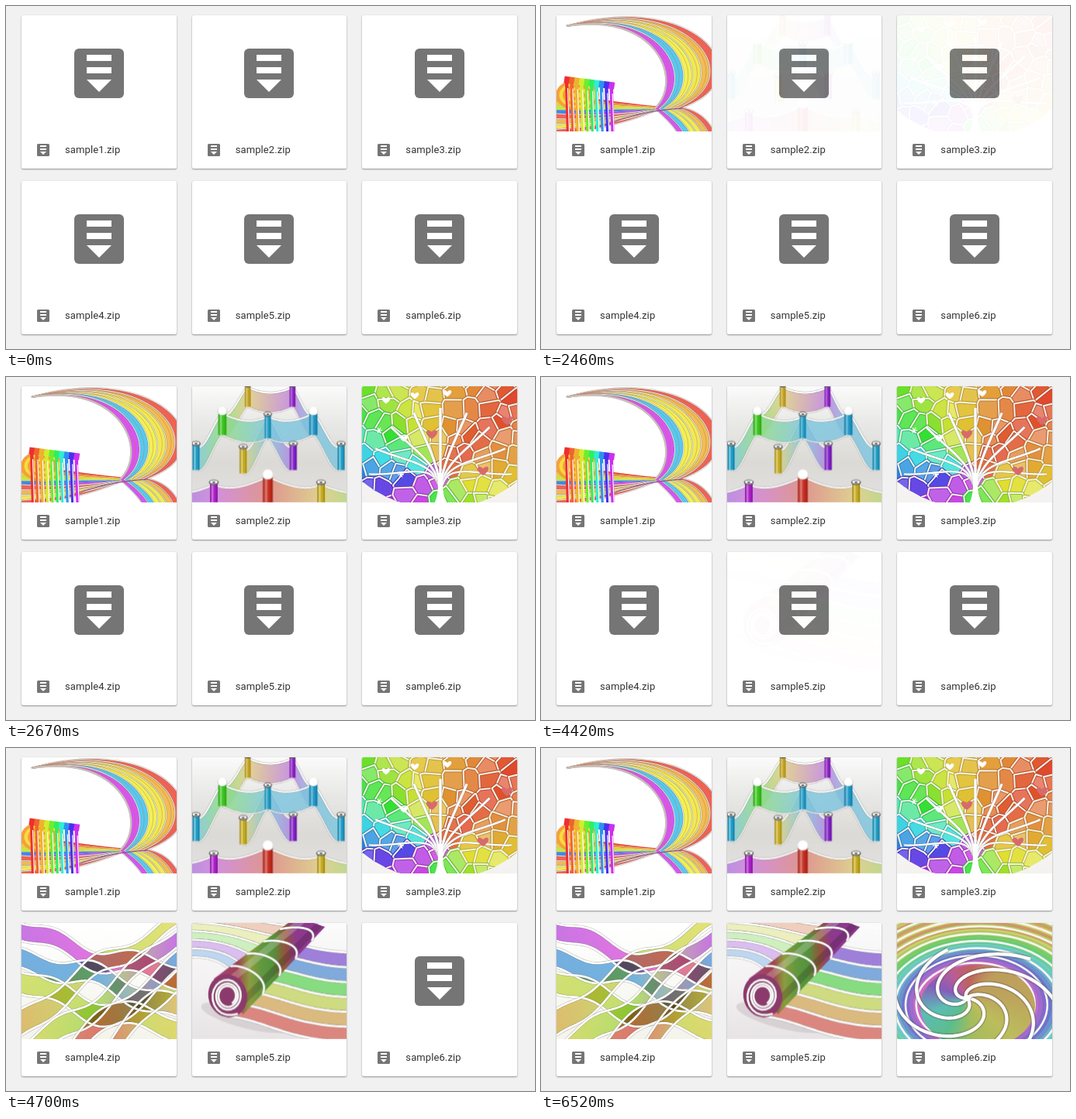
Recreate the animation shown at these times as an HTML page with a canvas. Size 682 by 443 pixels, loop 8000 ms.

```html
<!DOCTYPE html>
<html lang="en">
<head>
<meta charset="utf-8">
<title>Archive thumbnails</title>
<style>
  html, body { margin: 0; width: 100%; height: 100%; overflow: hidden; background: #f1f1f1; }
  .card {
    position: absolute; width: 199.67px; height: 198px; background: #fff; border-radius: 2px;
    box-shadow: 0 1px 2px rgba(0,0,0,.4), 0 0 1px rgba(0,0,0,.12);
    font: 400 13px/16px Roboto, sans-serif; letter-spacing: .1px; color: #333;
  }
  .card > * { position: absolute; }
  .big { left: 67.7px; top: 43px; width: 64px; height: 64px; }
  .small { left: 20px; top: 166px; width: 16px; height: 16px; }
  .name { left: 56px; top: 166px; white-space: nowrap; }
  canvas { left: 0; top: 0; width: 100%; height: 150px; border-radius: 2px 2px 0 0; animation: 8s infinite; }
</style>
</head>
<body>
<script>
const W = 200, H = 150, TAU = Math.PI * 2, LOOP = 8000, TICK = 70;
const lerp = (a, b, t) => a.map((v, i) => v + (b[i] - v) * t);
const hsl = (h, s = 85, l = 64) => `hsl(${h} ${s}% ${l}%)`;

// Curves are functions from t in 0..1 to a point.
const seg = (x0, y0, x1, y1) => t => lerp([x0, y0], [x1, y1], t);
const bez = (...p) => t => [0, 1].map(k => {
  const u = 1 - t;
  return u * u * u * p[k] + 3 * u * u * t * p[k + 2] + 3 * u * t * t * p[k + 4] + t * t * t * p[k + 6];
});
const mix = (f, h, k) => t => lerp(f(t), h(t), k);
const points = f => Array.from({ length: 61 }, (_, i) => f(i / 60));

function blend(g, cols, x0, x1, y0 = 0, y1 = 0) {
  if (typeof cols === 'string') return cols;
  const s = g.createLinearGradient(x0, y0, x1, y1);
  cols.forEach((c, i) => s.addColorStop(i / (cols.length - 1), c));
  return s;
}

function line(g, f, w, col) {
  g.beginPath();
  points(f).forEach(p => g.lineTo(...p));
  g.lineWidth = w;
  g.strokeStyle = col;
  g.stroke();
}

function tube(g, f, w) {
  line(g, f, w + 1.2, 'rgba(120,115,110,.45)');
  line(g, f, w, '#fff');
}

function sheet(g, f, h, cols, w) {
  g.beginPath();
  [...points(f), ...points(h).reverse()].forEach(p => g.lineTo(...p));
  g.fillStyle = blend(g, cols, f(0)[0], f(1)[0]);
  g.fill();
  if (w) { tube(g, f, w); tube(g, h, w); }
}

function fan(g, f, h, hues, w, s, l) {
  hues.forEach((hue, i) =>
    sheet(g, mix(f, h, i / hues.length), mix(f, h, (i + 1) / hues.length), hsl(hue, s, l), w));
}

function oval(g, x, y, rx, ry, fill, tilt = 0) {
  g.beginPath();
  g.ellipse(x, y, rx, ry, tilt, 0, TAU);
  g.fillStyle = fill;
  g.fill();
}

function back(g, cols) {
  g.fillStyle = blend(g, cols, 0, 0, 0, H);
  g.fillRect(0, 0, W, H);
}

function swirl(g) {
  back(g, '#fff');
  fan(g, bez(163,119, 110,118, 60,108, 0,101), bez(163,121, 110,124, 60,128, 0,133), [5, 32, 52, 70, 215, 290], 0, 75, 58);
  fan(g, bez(130,121, 95,127, 50,131, 0,127), bez(130,122, 100,136, 55,148, 0,154), [5, 38, 56, 5], .8);
  for (let i = 0; i < 6; i++) oval(g, 27, 103, 28 - i * 4.5, 20 - i * 3.3, hsl(32 + i % 2 * 20, 90, 60));
  fan(g, bez(126,120, 138,130, 150,142, 156,152), bez(160,119, 178,121, 195,132, 204,152), [290, 195, 60, 57, 40, 5], .7);
  const inner = bez(13,14, 130,-5, 165,85, 126,121), outer = bez(13,14, 180,-35, 270,80, 163,119);
  fan(g, inner, outer, [290, 195, 60, 57, 40, 5], .8);
  for (let k = .08; k < 1; k += .17) line(g, mix(inner, outer, k), .7, 'rgba(200,110,70,.6)');
  line(g, inner, 2.4, '#c9bfb8');
  line(g, bez(163,120, 120,123, 90,130, 45,148), 1.2, '#9a4a8a');
  for (let i = 0; i < 10; i++) {
    const x = 13 + i * 6.4, y = 82 + i * .8, col = hsl(290 * (i / 9) ** 1.3, 85, 56);
    line(g, seg(x, y, x + 2, H), 4.4, col);
    line(g, seg(x + 1.5, y + 12, x + 3.5, H), 1.2, '#fff');
    line(g, seg(x - 3, y + 1, x + 4, y + 2), 9, col);
  }
}

const posts = [
  [72, -2, 48], [130, -2, 280], [39, 32, 110], [98, 36, 195], [157, 32, 197], [5, 74, 195],
  [193, 74, 195], [66, 78, 50], [131, 74, 275], [28, 124, 290], [98, 114, 5], [167, 124, 50],
  [-40, 130, 250], [240, 130, 110]
].map(([x, y, hue]) => ({ x, y, hue, size: .75 + y / 500 }));

function band(g, a, b) {
  const edge = d => {
    const ya = a.y + 3 + d * a.size, yb = b.y + 3 + d * b.size, third = (b.x - a.x) / 3;
    return bez(a.x, ya, a.x + third, ya + 10, b.x - third, yb + 10, b.x, yb);
  };
  g.globalAlpha = .8;
  sheet(g, edge(0), edge(34), [hsl(a.hue, 60, 68), hsl(b.hue, 60, 68)]);
  g.globalAlpha = 1;
  tube(g, edge(0), 2);
  tube(g, edge(34), 1.2);
}

function post(g, { x, y, hue, size }) {
  const ball = [5, 110, 197].includes(hue), w = (ball ? 13 : 10) * size, left = x - w / 2;
  g.fillStyle = hsl(hue, 75, 50);
  g.fillRect(left, y, w, 38 * size);
  g.fillStyle = blend(g, ['rgba(0,0,0,.3)', 'rgba(255,255,255,.4)', 'rgba(0,0,0,.1)', 'rgba(0,0,0,.3)'], left, left + w);
  g.fillRect(left, y, w, 38 * size);
  oval(g, x, y, w / 2 + 1.5, ball ? w / 2 : 3.5, ball ? '#ddd' : '#666');
  oval(g, x, y - .5, w / 2, ball ? w / 2 : 2, '#fff');
  if (!ball) oval(g, x, y, 2, 1, '#555');
}

function fence(g) {
  back(g, ['#fbfbfb', '#e8e8e6', '#dcdad6', '#e2e2e2']);
  const links = '0-1 2-0 1-4 3-7 3-8 5-2 2-3 3-4 4-6 12-9 9-10 10-11 11-13';
  for (const link of links.split(' ')) band(g, ...link.split('-').map(i => posts[i]));
  posts.forEach(p => post(g, p));
}

// Keeps the part of a polygon that lies nearer to s than to o.
function cut(poly, s, o) {
  const side = p => (p[0] - (s[0] + o[0]) / 2) * (o[0] - s[0]) + (p[1] - (s[1] + o[1]) / 2) * (o[1] - s[1]);
  return poly.flatMap((p, i) => {
    const q = poly[(i + 1) % poly.length], a = side(p), b = side(q);
    const kept = a <= 0 ? [p] : [];
    if (a * b < 0) kept.push(lerp(p, q, a / (a - b)));
    return kept;
  });
}

// Hue by the angle from straight up, seen from the foot of the tree.
function leafHue(x, y) {
  const a = Math.atan2(x - 100, 112 - y) * 360 / TAU;
  if (a > 0) return 8 + Math.abs(a - 45) * .85;
  const k = Math.min(1, -a / 140);
  return 45 + 245 * k * k * (3 - 2 * k);
}

function heart(g, x, y, r, col) {
  g.beginPath();
  g.moveTo(x, y + r);
  g.bezierCurveTo(x - 2.2 * r, y - r * .4, x - r * .8, y - r * 1.6, x, y - r * .4);
  g.bezierCurveTo(x + r * .8, y - r * 1.6, x + 2.2 * r, y - r * .4, x, y + r);
  g.fillStyle = col;
  g.fill();
}

function tree(g) {
  back(g, ['#fff', '#f4f2f0']);
  let seed = 11;
  const rnd = () => (seed = seed * 16807 % 2147483647) / 2147483647;
  const sites = [];
  for (let y = -20; y < 170; y += 20)
    for (let x = -20; x < 220; x += 21) sites.push([x + rnd() * 18, y + rnd() * 17]);
  g.save();
  g.beginPath();
  g.ellipse(100, 20, 150, 138, 0, 0, TAU);
  g.clip();
  g.lineJoin = 'round';
  for (const s of sites) {
    let poly = [[-60, -60], [260, -60], [260, 210], [-60, 210]];
    for (const o of sites) if (o !== s) poly = cut(poly, s, o);
    const hue = leafHue(...s);
    g.beginPath();
    poly.forEach(p => g.lineTo(...p));
    g.closePath();
    g.fillStyle = hsl(hue, 74, 52 + rnd() * 16);
    g.fill();
    for (const [w, col] of [[4, hsl(hue, 60, 46)], [2, '#f4f2ea']]) {
      g.lineWidth = w;
      g.strokeStyle = col;
      g.stroke();
    }
  }
  g.restore();
  for (let i = -4; i <= 4; i++) {
    const dx = Math.sin(i * .38), dy = Math.cos(i * .38);
    tube(g, bez(101 + i * .7,128, 101 + dx * 10,98, 101 + dx * 50,118 - dy * 50, 101 + dx * 92,118 - dy * 90), 3.4 - Math.abs(i) * .3);
  }
  sheet(g, bez(97,112, 99,130, 98,140, 93,152), bez(105,112, 103,130, 104,140, 110,152), '#fff');
  [[31, 18], [54, 67], [68, 12], [110, 9], [90, 62], [187, 44], [156, 109]]
    .forEach(([x, y], i) => heart(g, x, y, i < 4 ? 4.5 : 6, i < 4 ? '#fff' : '#d86a6a'));
  for (const [x, y] of [[22, 57], [50, 114]])
    for (let a = 0; a < 3; a++) {
      const dx = Math.cos(a * TAU / 6) * 4, dy = Math.sin(a * TAU / 6) * 4;
      line(g, seg(x - dx, y - dy, x + dx, y + dy), 1.1, '#fff');
    }
}

function weave(g) {
  back(g, ['#fff', '#f4f4ec']);
  const strips = [];
  // A strip runs from height y0 at the left to y1 at the right, rippling in the middle.
  const strip = (y0, y1, w0, w1, phase, hues) => {
    const edge = side => t => [t * W,
      y0 + (y1 - y0) * t + side * (w0 + (w1 - w0) * t) / 2 - 11 * Math.sin(Math.PI * t) * Math.sin(TAU * 1.6 * t + phase)];
    strips.push([edge(-1), edge(1), hues.map(h => hsl(h, 68, 68))]);
  };
  [[285, 300, 5], [208, 205, 45], [68, 75, 58]]
    .forEach((hues, i) => strip(12 + 33 * i, 72 + 34 * i, 22 + 3 * i, 28, i * Math.PI, hues));
  [[42, 75, 58], [60, 85, 285], [20, 5, 210], [5, 10, 70]]
    .forEach((hues, j) => strip(128 + 50 * j, -6 + 27 * j, 34, 18 + 3 * j, (j + 1) * Math.PI, hues));
  g.globalCompositeOperation = 'multiply';
  for (const [f, h, cols] of strips) sheet(g, f, h, cols);
  g.globalCompositeOperation = 'source-over';
  for (const [f, h] of strips) { tube(g, f, 2.6); tube(g, h, 2.6); }
}

function roll(g) {
  back(g, ['#fcfcfc', '#f4f2f2', '#e8e4e6']);
  fan(g, bez(0,-12, 50,-10, 90,0, 130,4), bez(0,44, 35,44, 50,56, 62,80), [20, 65, 100, 275, 210], 2.2, 60, 84);
  oval(g, 70, 122, 60, 14, 'rgba(110,80,95,.15)', .25);
  fan(g, bez(140,28, 160,34, 180,37, 202,38), bez(40,120, 90,122, 120,152, 202,153), [260, 212, 115, 68, 38, 5], 2.8, 56, 68);
  const top = seg(28, 72, 135, -8), low = seg(66, 118, 172, 5);
  sheet(g, top, low, [320, 335, 350, 70, 95, 105, 20, 300].map((h, i) => hsl(h, 42, 46 - i)));
  line(g, mix(top, low, .25), 9, 'rgba(255,255,255,.22)');
  line(g, mix(top, low, .8), 9, 'rgba(30,10,20,.2)');
  for (let t = .2; t < 1; t += .2) {
    const [ax, ay] = top(t), [bx, by] = low(t + .04);
    tube(g, bez(ax, ay, ax + 16, ay - 4, bx + 10, by - 20, bx, by), 2.6);
  }
  oval(g, 46, 94, 25, 28, '#8c3a6c', -.3);
  tube(g, t => {
    const a = 1 + t * TAU * 3, r = 26 - 15 * Math.sqrt(t);
    return [46 + Math.cos(a) * r * .94, 94 + Math.sin(a) * r * 1.06];
  }, 2.5);
}

function vortex(g) {
  for (let d = 176; d > 44; d -= 3.5) {
    const k = d - 44;
    oval(g, 100 + k * .12, 104 + k * .1, d / .7, d, hsl(k < 60 ? 350 - 4.9 * k : 48 + 24 * Math.sin(k * .7), 52, 62));
    g.lineWidth = Math.round(k / 3.5) % 3 ? .5 : 2.6;
    g.strokeStyle = Math.round(k / 3.5) % 3 ? 'rgba(120,90,50,.3)' : '#f8f6ee';
    g.stroke();
  }
  const disc = g.createConicGradient(0, 90, 97);
  [45, 60, 75, 150, 175, 265, 325, 365, 400, 405].forEach((h, i) => disc.addColorStop(i / 9, hsl(h, 42, 55)));
  oval(g, 104, 108, 74, 54, disc);
  for (let k = 0; k < 6; k++) {
    const arm = t => {
      const a = k * TAU / 6 + 3.3 * t, r = 108 * t;
      return [90 + 14 * t + Math.cos(a) * r, 97 + 10 * t + Math.sin(a) * r * .72];
    };
    line(g, arm, 7.5, 'rgba(70,50,50,.2)');
    tube(g, arm, 4.2);
  }
  oval(g, 90, 97, 5, 4, '#fff');
}

const icon = size => `<svg class="${size}" viewBox="0 0 64 64"><rect width="64" height="64" rx="6" fill="#757575"/>
  <path d="M16 8h32v8H16zM16 24h32v8H16zM16 40h32L32 56z" fill="#fff"/></svg>`;

// Each picture jumps to its first opacity, then rises to full in equal steps.
const fade = (name, { start, steps, first }) => `@keyframes ${name} {
  0% { opacity: 0; animation-timing-function: step-end }
  ${start / LOOP * 100}% { opacity: ${first}; animation-timing-function: steps(${steps}) }
  ${(start + steps * TICK) / LOOP * 100}%, to { opacity: 1 } }`;

const scenes = [
  { draw: swirl, start: 500, steps: 2, first: .3 },
  { draw: fence, start: 2460, steps: 3, first: .06 },
  { draw: tree, start: 2460, steps: 3, first: .06 },
  { draw: weave, start: 4420, steps: 4, first: 0 },
  { draw: roll, start: 4420, steps: 4, first: .02 },
  { draw: vortex, start: 6310, steps: 3, first: .06 }
];

const style = document.createElement('style');
style.textContent = scenes.map((s, i) => fade('show' + i, s)).join('\n');
document.head.append(style);

scenes.forEach(({ draw }, i) => {
  const card = document.createElement('div');
  card.className = 'card';
  card.style.left = 20 + (i % 3) * 219.67 + 'px';
  card.style.top = (i < 3 ? 12 : 226) + 'px';
  card.innerHTML = `${icon('big')}<canvas width="${W}" height="${H}" style="animation-name:show${i}"></canvas>
    ${icon('small')}<span class="name">sample${i + 1}.zip</span>`;
  draw(card.querySelector('canvas').getContext('2d'));
  document.body.append(card);
});
</script>
</body>
</html>
```
